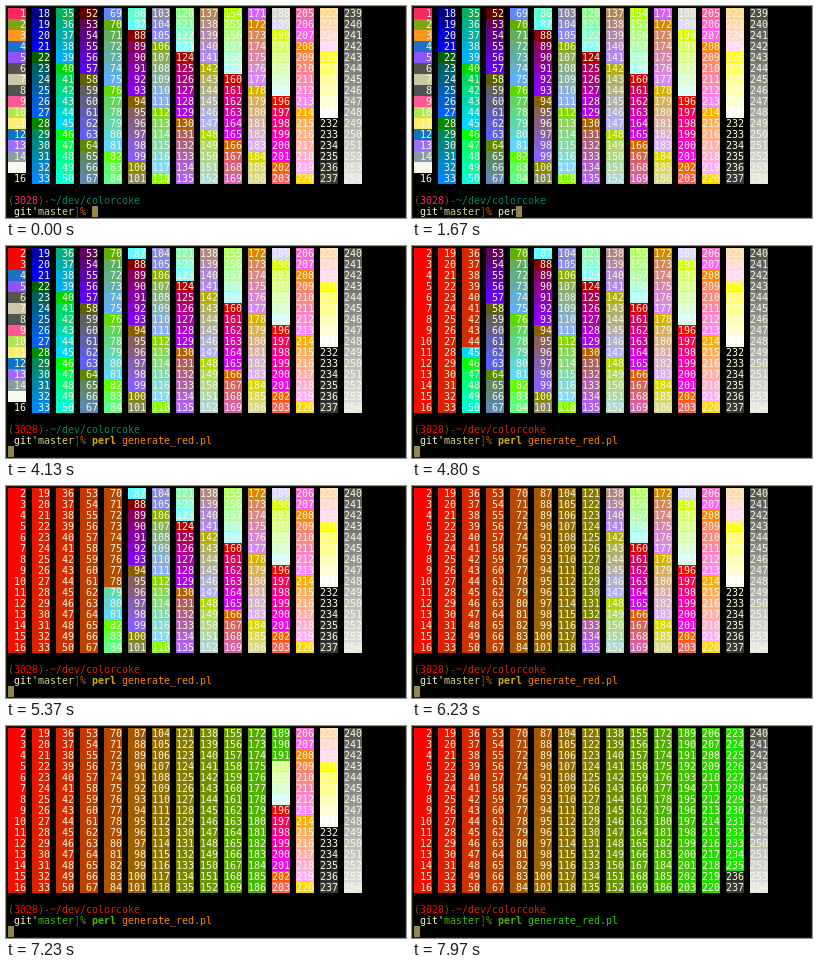
These frames come from a looping animation (400x212 px, 8000 ms). An HTML page with a canvas:

```html
<!DOCTYPE html>
<html lang="en">
<head>
<meta charset="utf-8">
<title>Terminal palette</title>
<style>
  html, body { margin: 0; width: 100%; height: 100%; overflow: hidden; background: #000; }
  canvas { display: block; width: 400px; height: 212px; }
</style>
</head>
<body>
<canvas id="stage" width="400" height="212"></canvas>
<script>
const ctx = document.getElementById('stage').getContext('2d');
const LOOP = 8000, PAD = 2, CW = 6, CH = 11;
const ENTER = 4000, COMPLETE = 3030;
const FONT = '10px "DejaVu Sans Mono", "Liberation Mono", monospace';
const FG = '#f8f8d8', DIM = '#545c28', CURSOR = '#94854a', BORDER = '#20200c';

const THEME = ['#1b1d1e', '#f92660', '#82a414', '#fd971f', '#2070c8', '#8c54fe', '#56544c', '#ccc6a8',
  '#505354', '#ff5995', '#b6e354', '#feed6c', '#0c73c2', '#9e6ffe', '#899ca1', '#f8f8f2'];
const KEYS = [1400, 1500, 1670, 2230, 2400, 2600, 2700, 2800];
const COMMAND = 'perl generate_red.pl ';

// time and number of palette entries already recoloured
const PROGRESS = [[4050, 0], [4800, 45], [5370, 79], [6230, 133], [7230, 192], [7970, 236], [8000, 238]];

function xterm(i) {
  if (i < 16) return THEME[i];
  if (i > 231) {
    const g = 8 + 10 * (i - 232);
    return `rgb(${g},${g},${g})`;
  }
  const n = i - 16;
  const level = v => v ? 55 + 40 * v : 0;
  return `rgb(${level(Math.floor(n / 36))},${level(Math.floor(n / 6) % 6)},${level(n % 6)})`;
}

function recoloured(t) {
  for (let k = 1; k < PROGRESS.length; k++) {
    const [t0, n0] = PROGRESS[k - 1], [t1, n1] = PROGRESS[k];
    if (t < t0) return n0;
    if (t < t1) return Math.floor(n0 + (n1 - n0) * (t - t0) / (t1 - t0));
  }
  return 238;
}

function write(text, col, row, color, bold) {
  ctx.font = (bold ? 'bold ' : '') + FONT;
  ctx.fillStyle = color;
  [...text].forEach((ch, i) => ctx.fillText(ch, PAD + (col + i) * CW, PAD + row * CH + 9));
}

function block(col, row, width, color) {
  ctx.fillStyle = color;
  ctx.fillRect(PAD + col * CW, PAD + row * CH, width * CW, CH);
}

function draw(t) {
  const done = recoloured(t);
  const color = i => i < done ? `rgb(${255 - i},${i},0)` : xterm(i);
  const scroll = t >= ENTER ? 1 : 0;

  ctx.fillStyle = '#000';
  ctx.fillRect(0, 0, 400, 212);
  ctx.strokeStyle = BORDER;
  ctx.strokeRect(0.5, 0.5, 399, 211);

  for (let c = 0; c < 15; c++) {
    for (let r = 1 + scroll; r <= 16; r++) {
      const i = c * 17 + r, row = r - 1 - scroll;
      block(c * 4, row, 3, color(i));
      write(String(i).padStart(3), c * 4, row, FG);
    }
  }

  const info = 17 - scroll, prompt = 18 - scroll;
  write('(', 0, info, DIM);
  write('3028', 1, info, color(1));
  write(')-', 5, info, DIM);
  write('~/dev/colorcoke', 7, info, color(29));

  write("git'", 1, prompt, FG);
  write('master', 5, prompt, color(186));
  write(']', 11, prompt, DIM);
  write('%', 12, prompt, color(166));

  const complete = t >= COMPLETE;
  const typed = complete ? COMMAND.length : KEYS.filter(k => t >= k).length;
  const line = COMMAND.slice(0, typed);
  write(line.slice(0, 4), 14, prompt, complete ? color(178) : FG, complete);
  write(line.slice(4), 18, prompt, complete ? color(208) : FG);

  block(scroll ? 0 : 14 + typed, 18, 1, CURSOR);
}

function tick() {
  draw(performance.now() % LOOP);
  requestAnimationFrame(tick);
}
tick();
</script>
</body>
</html>
```
